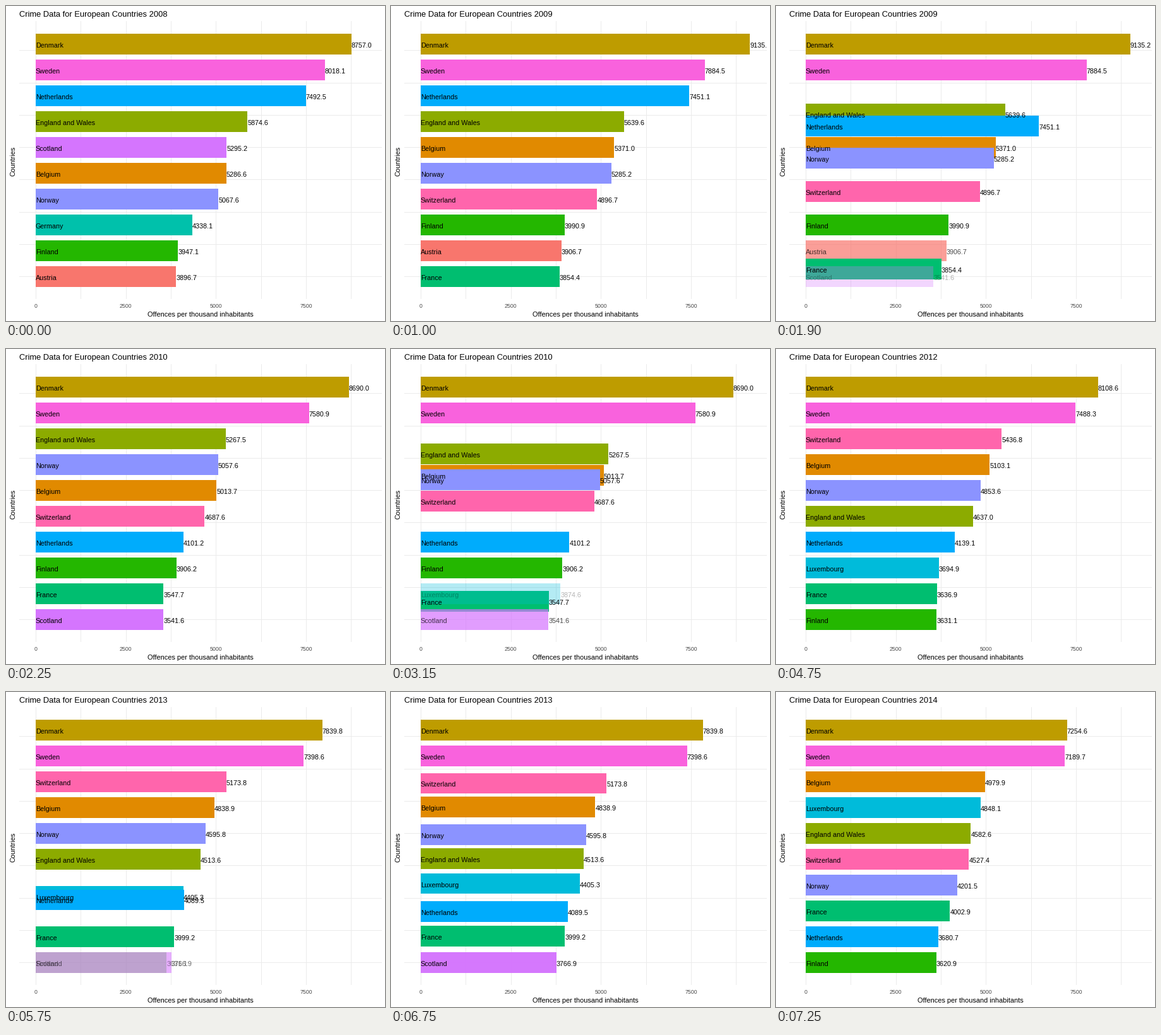
Recreate the animation shown at these times as a matplotlib script. Size 600 px wide and 500 px high, loop 8000 ms.

```python
import math

import matplotlib.pyplot as plt
from matplotlib.animation import FuncAnimation
from matplotlib.patches import Rectangle

WIDTH, HEIGHT, DPI = 600, 500, 100
LEFT, RIGHT, TOP, BOTTOM = 21, 594.5, 24, 465
ZERO_X, UNIT = 46.95, 0.05707
ROW_Y, ROW_STEP, BAR_H = 60.5, 41, 32.8

INTERVAL, FRAMES = 50, 160
FIRST_CHANGE, CYCLE, STEPS = 10, 25, 11

COLORS = {
    "Austria": "#F8766D", "Belgium": "#E18A00", "Denmark": "#BE9C00",
    "England and Wales": "#8CAB00", "Finland": "#24B700",
    "France": "#00BE70", "Germany": "#00C1AB", "Luxembourg": "#00BBDA",
    "Netherlands": "#00ACFC", "Norway": "#8B93FF", "Scotland": "#D575FE",
    "Sweden": "#F962DD", "Switzerland": "#FF65AC",
}

# One entry per year from 2008, each in rank order
YEARS = [
    {"Denmark": 8757.0, "Sweden": 8018.1, "Netherlands": 7492.5,
     "England and Wales": 5874.6, "Scotland": 5295.2, "Belgium": 5286.6,
     "Norway": 5067.6, "Germany": 4338.1, "Finland": 3947.1,
     "Austria": 3896.7},
    {"Denmark": 9135.2, "Sweden": 7884.5, "Netherlands": 7451.1,
     "England and Wales": 5639.6, "Belgium": 5371.0, "Norway": 5285.2,
     "Switzerland": 4896.7, "Finland": 3990.9, "Austria": 3906.7,
     "France": 3854.4},
    {"Denmark": 8690.0, "Sweden": 7580.9, "England and Wales": 5267.5,
     "Norway": 5057.6, "Belgium": 5013.7, "Switzerland": 4687.6,
     "Netherlands": 4101.2, "Finland": 3906.2, "France": 3547.7,
     "Scotland": 3541.6},
    {"Denmark": 8612.4, "Sweden": 7723.1, "Belgium": 5220.1,
     "Switzerland": 5123.1, "England and Wales": 5080.4, "Norway": 4755.7,
     "Netherlands": 4183.2, "Finland": 4002.8, "Luxembourg": 3874.6,
     "France": 3580.2},
    {"Denmark": 8108.6, "Sweden": 7488.3, "Switzerland": 5436.8,
     "Belgium": 5103.1, "Norway": 4853.6, "England and Wales": 4637.0,
     "Netherlands": 4139.1, "Luxembourg": 3694.9, "France": 3636.9,
     "Finland": 3631.1},
    {"Denmark": 7839.8, "Sweden": 7398.6, "Switzerland": 5173.8,
     "Belgium": 4838.9, "Norway": 4595.8, "England and Wales": 4513.6,
     "Luxembourg": 4405.3, "Netherlands": 4089.5, "France": 3999.2,
     "Scotland": 3766.9},
    {"Denmark": 7254.6, "Sweden": 7189.7, "Belgium": 4979.9,
     "Luxembourg": 4848.1, "England and Wales": 4582.6,
     "Switzerland": 4527.4, "Norway": 4201.5, "France": 4002.9,
     "Netherlands": 3680.7, "Finland": 3620.9},
]
STATES = [{name: (rank, value) for rank, (name, value) in enumerate(y.items())}
          for y in YEARS]

plt.rcParams["font.family"] = "Liberation Sans"
fig = plt.figure(figsize=(WIDTH / DPI, HEIGHT / DPI), dpi=DPI, facecolor="white")
ax = fig.add_axes([LEFT / WIDTH, 1 - BOTTOM / HEIGHT,
                   (RIGHT - LEFT) / WIDTH, (BOTTOM - TOP) / HEIGHT])
ax.set_xlim(LEFT, RIGHT)
ax.set_ylim(BOTTOM, TOP)
ax.axis("off")


def add_text(x, y, text, px, color="black", **kw):
    return ax.text(x, y, text, fontsize=px * 72 / DPI, color=color,
                   va="baseline", zorder=3, **kw)


def add_rect(x, y, w, h, color, zorder):
    return ax.add_patch(Rectangle((x, y), w, h, facecolor=color,
                                  linewidth=0, zorder=zorder))


def value_x(value):
    return ZERO_X + value * UNIT


for i in range(8):
    add_rect(round(value_x(1250 * i)), TOP, 1, BOTTOM - TOP, "#EBEBEB", 1)
    grid_y = ROW_Y + ROW_STEP * (9 - 1.25 * i)
    add_rect(LEFT, int(grid_y), RIGHT - LEFT, 1, "#EBEBEB", 1)

for tick in (0, 2500, 5000, 7500):
    add_text(value_x(tick), 479, str(tick), 8.8, "#4D4D4D", ha="center")
add_text(308, 493, "Offences per thousand inhabitants", 11, ha="center")
add_text(15, 246, "Countries", 11, ha="center", rotation=90,
         rotation_mode="anchor")
title = add_text(21, 17, "", 12.85)

rows = {}
for name, color in COLORS.items():
    rows[name] = (add_rect(ZERO_X, 0, 0, BAR_H, color, 2),
                  add_text(ZERO_X, 100, name, 10.7),
                  add_text(ZERO_X, 100, "", 10.8, clip_on=True))


def timeline(frame):
    """Return the year index being left and the step of its transition."""
    index, step = divmod(frame - FIRST_CHANGE, CYCLE)
    if index < 0:
        return 0, 0
    return index, min(step + 1, STEPS)


def update(frame):
    index, step = timeline(frame)
    t = (1 - math.cos(math.pi * step / STEPS)) / 2
    before, after = STATES[index], STATES[index + 1]
    switched = t > 0.5
    title.set_text(f"Crime Data for European Countries {2008 + index + switched}")

    for name, parts in rows.items():
        start, end = before.get(name), after.get(name)
        alpha = (1 - t) * (start is not None) + t * (end is not None)
        for part in parts:
            part.set_visible(alpha > 0.001)
            part.set_alpha(min(alpha, 1))
        if alpha <= 0.001:
            continue
        start, end = start or end, end or start
        rank, value = (a + (b - a) * t for a, b in zip(start, end))
        y = ROW_Y + ROW_STEP * rank
        bar, label, number = parts
        bar.set_y(y - BAR_H / 2)
        bar.set_width(value * UNIT)
        label.set_y(round(y + 5.5))
        number.set_position((value_x(value), round(y + 5.5)))
        number.set_text(f"{(end if switched else start)[1]:.1f}")
    return []


anim = FuncAnimation(fig, update, frames=FRAMES, interval=INTERVAL,
                     repeat=True, repeat_delay=0, blit=False)
plt.show()
```
